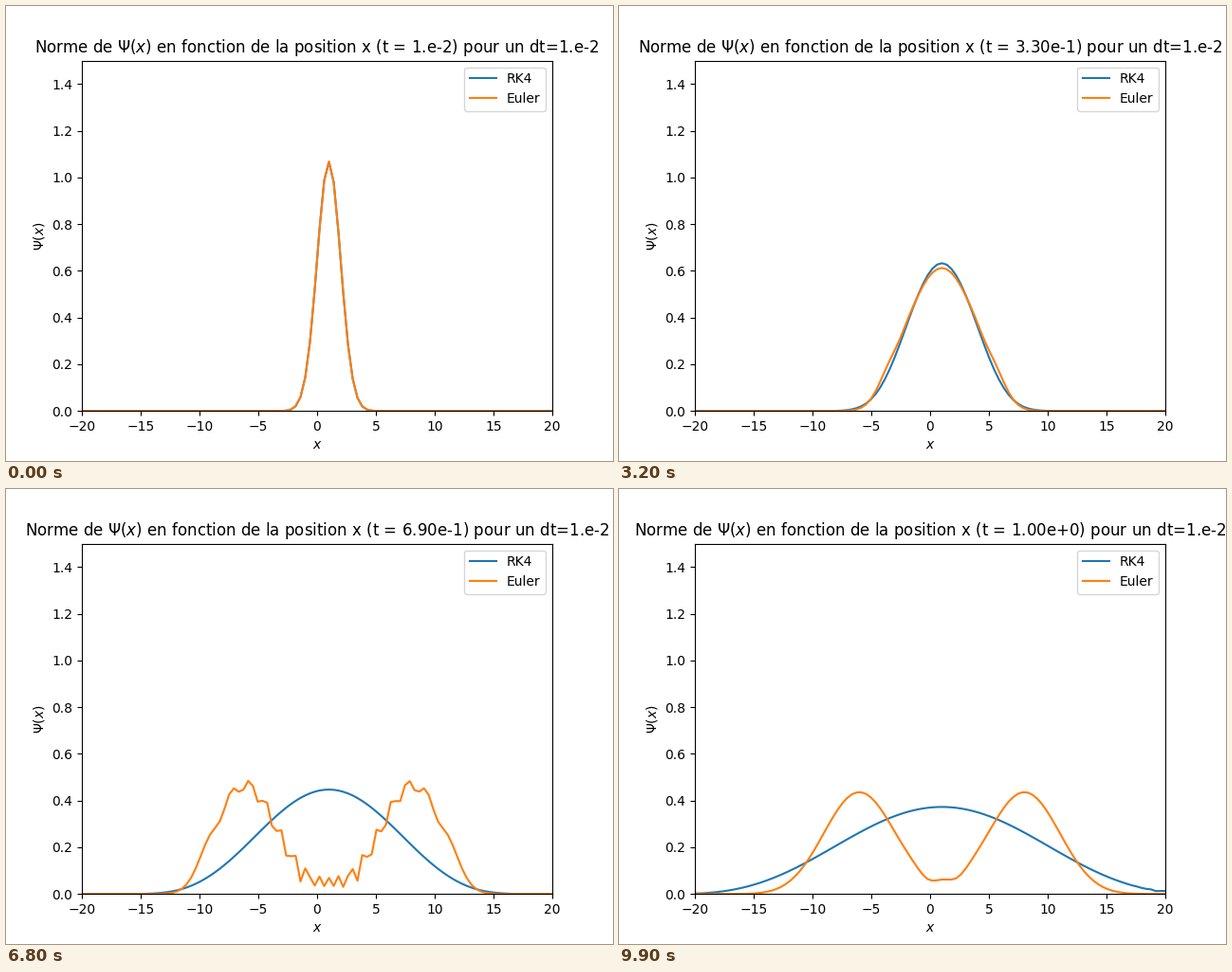
Recreate the animation shown at these times as a matplotlib script. Size 640 by 480 pixels, loop 10 s.

```python
import numpy as np
import matplotlib.pyplot as plt
from matplotlib.animation import FuncAnimation

N, STEPS = 100, 100
DX, DT = 0.2, 1e-2
x = np.linspace(-20, 20, N)


def deriv(psi):
    """Free Schrodinger equation, psi = 0 beyond both ends."""
    p = np.pad(psi, 1)
    return 1j * (p[2:] - 2 * psi + p[:-2]) / DX**2


def euler(psi):
    return psi + DT * deriv(psi)


def rk4(psi):
    k1 = deriv(psi)
    k2 = deriv(psi + DT / 2 * k1)
    k3 = deriv(psi + DT / 2 * k2)
    k4 = deriv(psi + DT * k3)
    return psi + DT / 6 * (k1 + 2 * k2 + 2 * k3 + k4)


def normalize(psi):
    return psi / np.sqrt(np.sum(np.abs(psi)**2) * DX)


def evolve(step):
    psi = normalize(np.exp(-(x - 1)**2 / 2).astype(complex))
    norms = []
    for _ in range(STEPS):
        psi = normalize(step(psi))
        norms.append(np.abs(psi))
    return norms


def sci(value):
    return np.format_float_scientific(value, precision=2, exp_digits=1)


# Summed step by step: the rounding decides how many digits the title shows.
times = np.cumsum(np.full(STEPS, DT))
runs = [evolve(rk4), evolve(euler)]

fig, ax = plt.subplots(figsize=(6.4, 4.8), dpi=100)
lines = [ax.plot(x, run[0], label=name)[0]
         for run, name in zip(runs, ("RK4", "Euler"))]
ax.set_xlim(-20, 20)
ax.set_ylim(0, 1.5)
ax.set_xlabel("$x$")
ax.set_ylabel(r"$\Psi(x)$")
ax.legend(loc="upper right")
title = ax.set_title("")


def update(i):
    for line, run in zip(lines, runs):
        line.set_ydata(run[i])
    title.set_text(r"Norme de $\Psi(x)$ en fonction de la position x "
                   f"(t = {sci(times[i])}) pour un dt={sci(DT)}")
    return [*lines, title]


anim = FuncAnimation(fig, update, frames=STEPS, interval=100, repeat=True)
plt.show()
```
